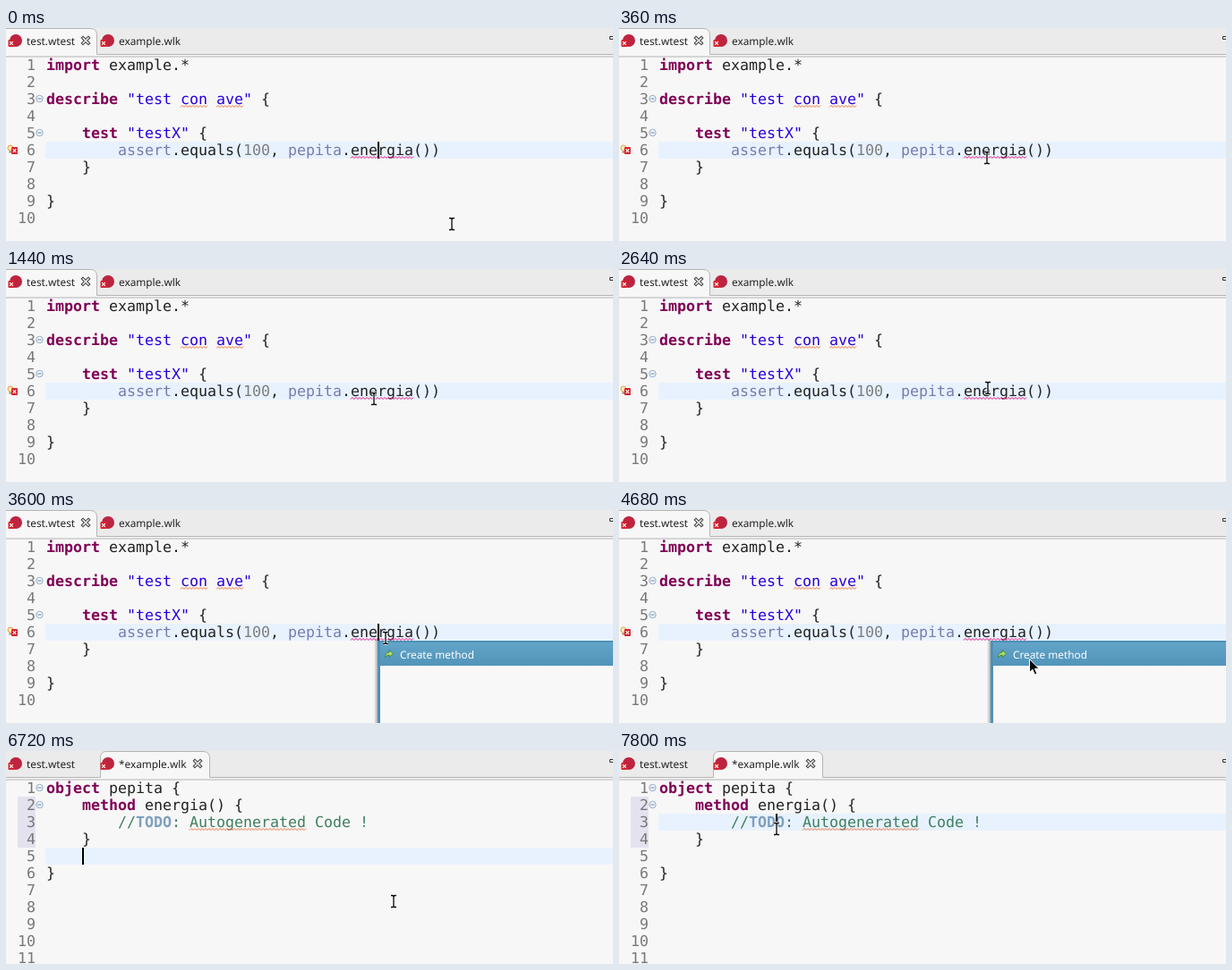
An HTML page for the animation above (8 s loop, 678 px wide and 238 px high).

```html
<!DOCTYPE html>
<html lang="es">
<head>
<meta charset="utf-8">
<title>Quick fix: create method</title>
<style>
html, body { margin: 0; width: 100%; height: 100%; overflow: hidden; background: #f7f7f7; }
svg { display: block; width: 678px; height: 238px; }
text { font: 11.8px "Noto Sans", sans-serif; fill: #222; white-space: pre; text-rendering: geometricPrecision; }
.code text { font: 16.61px "DejaVu Sans Mono", monospace; }
.code .num { fill: #787878; text-anchor: end; }
.kw { fill: #7f0055; font-weight: bold; }
.str { fill: #2a00e0; }
.obj { fill: #7a7ab0; }
.lit { fill: #7d7d7d; }
.com { fill: #3f7f5f; }
.todo { fill: #7f9fbf; font-weight: bold; }
.wave { fill: none; stroke-width: 1; }
</style>
</head>
<body>
<svg viewBox="0 0 678 238">
  <defs>
    <linearGradient id="select" x2="0" y2="1">
      <stop stop-color="#62a5c9"/><stop offset="1" stop-color="#5294b9"/>
    </linearGradient>
    <linearGradient id="shade">
      <stop stop-color="#000" stop-opacity="0"/><stop offset="1" stop-color="#000" stop-opacity=".3"/>
    </linearGradient>
    <g id="error">
      <rect width="7" height="8" rx="1" fill="#d3222f"/>
      <path d="M1.7 2.2l3.6 3.6m0-3.6l-3.6 3.6" stroke="#fff" stroke-width="1.2"/>
    </g>
    <g id="bulbError">
      <circle cx="4" cy="4" r="3" fill="#fff0b0" stroke="#e0a050"/>
      <path d="M2.5 8.5h3" stroke="#a08050" stroke-width="2"/>
      <use href="#error" x="5" y="3"/>
    </g>
    <g id="fileIcon">
      <circle cx="11" cy="14" r="7" fill="#bd2440"/>
      <use href="#error" x="2.5" y="13"/>
    </g>
    <g id="close" fill="none" stroke-linecap="square">
      <path d="M-3-3L3 3M3-3L-3 3" stroke="#444" stroke-width="3.6"/>
      <path d="M-3-3L3 3M3-3L-3 3" stroke="#fff" stroke-width="1.4"/>
    </g>
    <g id="fold" fill="none" stroke="#8fa9c4">
      <circle r="3.7" fill="#f4f8fc"/><path d="M-2 0h4" stroke="#5f7f9f"/>
    </g>
    <path id="fixArrow" d="M.5 9Q0 3.5 5 3V.5L9.5 4.5 5 8.5V6Q2 6 .5 9z"/>
  </defs>

  <rect width="678" height="238" fill="#f7f7f7"/>
  <g id="testEditor" class="code"></g>
  <g id="objectEditor" class="code"></g>
  <rect id="caret" width="2" height="19"/>

  <rect width="678" height="30" fill="#ebebeb"/>
  <path id="tabShape" fill="#f7f7f7" stroke="#b4b4b4"/>
  <use href="#fileIcon"/>
  <use href="#fileIcon" x="103"/>
  <text x="23" y="19">test.wtest</text>
  <text id="secondTab" x="126" y="19"></text>
  <use id="closeTab" href="#close" y="14"/>
  <path d="M679 9.5H674.5V12.5H679" fill="none" stroke="#333"/>

  <g id="hover">
    <rect x="382" y="150" width="3" height="88" fill="url(#shade)"/>
    <rect x="385.5" y="151.5" width="300" height="100" fill="#fce9a0" stroke="#3c3a30"/>
    <path d="M387 174.5H678M387 226.5H678" stroke="#d9c987"/>
    <use href="#bulbError" x="390" y="157"/>
    <text x="404" y="167">The well-known object does not understand this message</text>
    <text x="390" y="189.500">1 quick fix available:</text>
    <use href="#fixArrow" x="400" y="204" fill="#4fa040"/>
    <text x="417" y="213.500" style="fill:#1c7fa6;text-decoration:underline">Create method</text>
    <text x="629" y="238" style="fill:#8d8766;font-size:10.8px">Press 'F2' for focus</text>
  </g>

  <g id="menu">
    <rect x="411" y="145" width="4" height="93" fill="url(#shade)"/>
    <rect x="415" y="146" width="263" height="92" fill="#4f90b5"/>
    <rect x="418" y="148" width="260" height="90" fill="#f8f8f8"/>
    <rect x="418" y="148" width="260" height="26" fill="url(#select)"/>
    <use href="#fixArrow" x="423" y="156" fill="#b5dc6a" stroke="#2f7a35" stroke-width=".8"/>
    <text x="440" y="165.500" style="fill:#fff">Create method</text>
  </g>

  <g id="beam" fill="none">
    <path d="M-3-6.500H-1L0-5.500 1-6.500H3M0-5.500V5.500M-3 6.500H-1L0 5.500 1 6.500H3" stroke="#fff" stroke-width="3"/>
    <path d="M-3-6.500H-1L0-5.500 1-6.500H3M0-5.500V5.500M-3 6.500H-1L0 5.500 1 6.500H3" stroke="#000" stroke-width="1.3"/>
  </g>
  <path id="arrow" d="M.5.500V15.500L4 12.200 6.300 18 8.900 17 6.500 11.300H11z" stroke="#fff"/>
</svg>

<script>
const LOOP = 8000, STEP = 120;
const byId = id => document.getElementById(id);
const lineTop = line => 32 + 19 * (line - 1);
const columnX = column => 45 + 10 * column;

function add(parent, tag, attributes, content = '') {
  const node = document.createElementNS('http://www.w3.org/2000/svg', tag);
  for (const key in attributes) node.setAttribute(key, attributes[key]);
  node.textContent = content;
  return parent.appendChild(node);
}

function addHighlight(editor) {
  return add(editor, 'rect', { x: 44, width: 634, height: 19, fill: '#e8f2fe' });
}

// Each row is [column, ...[style, text] runs].
function addCode(editor, lastLine, rows) {
  for (let line = 1; line <= lastLine; line++)
    add(editor, 'text', { class: 'num', x: 33, y: lineTop(line) + 15 }, line);
  for (const line in rows) {
    const [column, ...runs] = rows[line];
    const text = add(editor, 'text', { x: columnX(column), y: lineTop(line) + 15 });
    for (const [style, content] of runs) add(text, 'tspan', { class: style }, content);
  }
}

function addWave(editor, line, column, length, stroke) {
  let d = `M${columnX(column)} ${lineTop(line) + 18.5}`;
  for (let i = 0; i < length * 5; i++) d += `l2 ${i % 2 ? 2 : -2}`;
  add(editor, 'path', { class: 'wave', d, stroke });
}

const addFold = (editor, line) =>
  add(editor, 'use', { href: '#fold', x: 37.5, y: lineTop(line) + 9 });

const testEditor = byId('testEditor');
addHighlight(testEditor).setAttribute('y', lineTop(6));
addCode(testEditor, 10, {
  1: [0, ['kw', 'import'], ['', ' example.*']],
  3: [0, ['kw', 'describe'], ['str', ' "test con ave"'], ['', ' {']],
  5: [4, ['kw', 'test'], ['str', ' "testX"'], ['', ' {']],
  6: [8, ['obj', 'assert'], ['', '.equals('], ['lit', '100'], ['', ', '], ['obj', 'pepita'], ['', '.energia())']],
  7: [4, ['', '}']],
  9: [0, ['', '}']]
});
addFold(testEditor, 3);
addFold(testEditor, 5);
addWave(testEditor, 3, 15, 3, '#f0703c');
addWave(testEditor, 3, 19, 3, '#f0703c');
addWave(testEditor, 6, 34, 7, '#e8127c');
add(testEditor, 'use', { href: '#bulbError', x: 1, y: 130 });

const objectEditor = byId('objectEditor');
const objectHighlight = addHighlight(objectEditor);
add(objectEditor, 'rect', { x: 13, y: lineTop(2), width: 20, height: 57, fill: '#e4e2ef' });
addCode(objectEditor, 11, {
  1: [0, ['kw', 'object'], ['', ' pepita {']],
  2: [4, ['kw', 'method'], ['', ' energia() {']],
  3: [8, ['com', '//'], ['todo', 'TODO'], ['com', ': Autogenerated Code !']],
  4: [4, ['', '}']],
  6: [0, ['', '}']]
});
addFold(objectEditor, 1);
addFold(objectEditor, 2);
addWave(objectEditor, 3, 16, 13, '#f0703c');

const pointerPath = [
  [0, 498, 219], [360, 411, 145], [1440, 411, 145], [1560, 412, 140],
  [2040, 412, 140], [2160, 412, 133], [3480, 412, 133], [3960, 459, 172],
  [4200, 459, 172], [4320, 458, 166], [4920, 458, 166], [5400, 302, 131],
  [5520, 306, 132], [5760, 392, 154], [5880, 440, 163], [6000, 475, 171],
  [6600, 475, 171], [6720, 433, 168], [7320, 176, 87], [LOOP, 176, 87]
];
const testBlinks = [240, 960, 1440, 2040, 2640, 3240, 3840, 4320, 4680];
const objectBlinks = [7200, 7800];

function pointerAt(t) {
  const next = pointerPath.findIndex(point => point[0] > t);
  const [t0, x0, y0] = pointerPath[next - 1], [t1, x1, y1] = pointerPath[next];
  const k = (t - t0) / (t1 - t0);
  return [Math.round(x0 + (x1 - x0) * k), Math.round(y0 + (y1 - y0) * k)];
}

const show = (node, visible) => node.setAttribute('visibility', visible ? 'visible' : 'hidden');
const isLit = (blinks, t) => blinks.filter(time => time <= t).length % 2 === 0;

function place(node, x, y) {
  node.setAttribute('x', x);
  node.setAttribute('y', y);
}

function draw(time) {
  const t = Math.floor(time % LOOP / STEP) * STEP;
  const inObject = t >= 6600, clicked = t >= 7680;
  const menuOpen = t >= 3000 && !inObject;

  show(testEditor, !inObject);
  show(objectEditor, inObject);
  show(byId('hover'), t >= 840 && t < 960);
  show(byId('menu'), menuOpen);

  byId('tabShape').setAttribute('d', inObject
    ? 'M-2 29.5H105.5V7Q105.5 .5 112 .5H220Q227.5 .5 227.5 8V29.5H680V32H-2z'
    : 'M-2 .5H94Q101.5 .5 101.5 8V29.5H680V32H-2z');
  byId('secondTab').textContent = inObject ? '*example.wlk' : 'example.wlk';
  byId('closeTab').setAttribute('x', inObject ? 214 : 89);

  // Cover the lower edge of the tab outline.
  objectHighlight.setAttribute('y', lineTop(clicked ? 3 : 5));
  const [column, line] = !inObject ? [37, 6] : clicked ? [13, 3] : [4, 5];
  place(byId('caret'), columnX(column), lineTop(line));
  show(byId('caret'), isLit(inObject ? objectBlinks : testBlinks, t));

  const [x, y] = pointerAt(t);
  const overMenu = menuOpen && x >= 415 && y >= 147;
  show(byId('arrow'), overMenu);
  show(byId('beam'), !overMenu);
  byId(overMenu ? 'arrow' : 'beam').setAttribute('transform', `translate(${x} ${y})`);
}

const start = performance.now();
function tick() {
  draw(performance.now() - start);
  requestAnimationFrame(tick);
}
tick();
</script>
</body>
</html>
```
